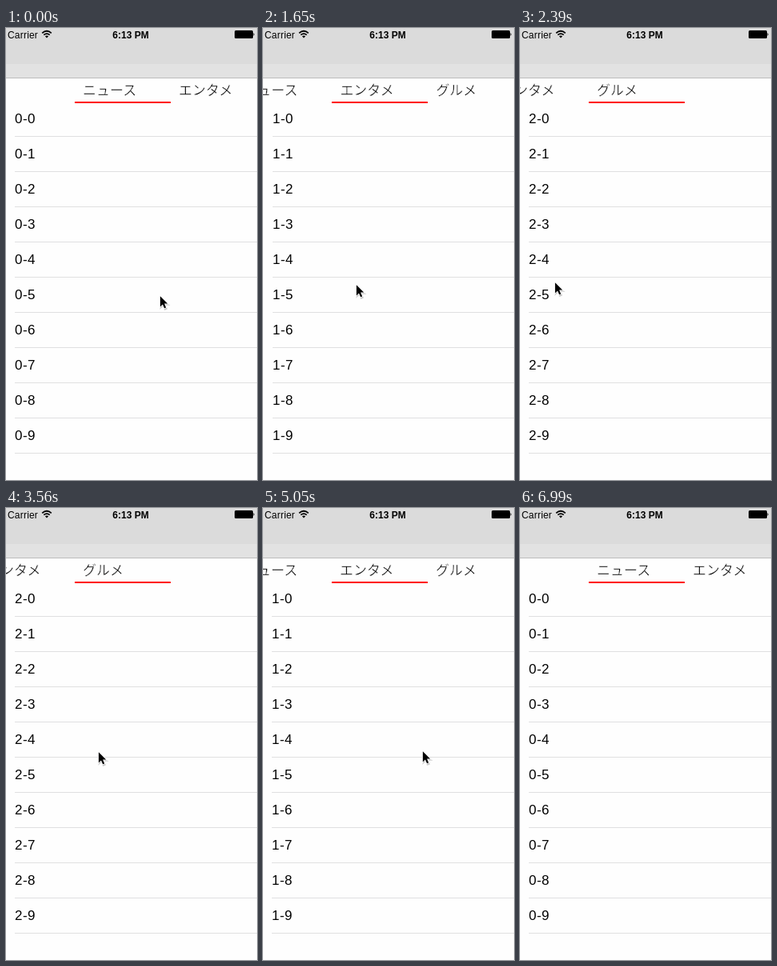
Write an HTML page that moves like this. It is 314x565 px and loops after 7710 ms.

```html
<!DOCTYPE html>
<html lang="ja">
<head>
<meta charset="utf-8">
<title>Tabbed pages</title>
<style>
  @property --scroll { syntax: "<number>"; inherits: true; initial-value: 0; }
  @property --x { syntax: "<number>"; inherits: true; initial-value: 192; }
  @property --y { syntax: "<number>"; inherits: true; initial-value: 335; }

  html, body { margin: 0; width: 100%; height: 100%; overflow: hidden; }
  #stage {
    position: relative; width: 314px; height: 565px; overflow: hidden;
    background: #fefefe; color: #000;
    font: 17px/44px "Liberation Sans", Arial, sans-serif;
    animation: session 7710ms step-end infinite;
  }
  #stage > * { position: absolute; }

  .bar {
    left: 0; top: 0; width: 314px; height: 62px;
    background: linear-gradient(#dbdbdb 45px, #e2e2e2 45px);
    border-bottom: 1px solid #bcbcbc;
  }
  .status { top: 1px; font-size: 12px; line-height: 17px; white-space: nowrap; }
  .carrier { left: 2px; letter-spacing: .2px; }
  .clock { left: 0; width: 312px; text-align: center; font-weight: bold; }
  .icons { left: 0; top: 0; }

  .tabs {
    left: 96px; top: 63px; display: flex;
    font: 17px/28px "Noto Sans CJK JP", "Noto Sans CJK", sans-serif;
    -webkit-text-stroke: .5px #fefefe; /* thins the strokes */
    transform: translateX(calc(var(--scroll) * -.375px));
  }
  .tabs span { width: 120px; white-space: nowrap; }
  .marker { left: 86px; top: 92px; width: 120px; height: 2px; background: #f00; }

  .pages {
    left: -4px; top: 92px; display: flex;
    transform: translateX(calc(var(--scroll) * -1px));
  }
  .page { width: 320px; flex: none; }
  .row { height: 43px; margin-left: 15px; border-bottom: 1px solid #e0e0e1; letter-spacing: .45px; }

  .cursor {
    left: -.5px; top: -1px; overflow: visible;
    transform: translate(calc(var(--x) * 1px), calc(var(--y) * 1px));
  }

  @keyframes session {
    0%     { --scroll: 0; --x: 192; --y: 335; }
    5.83%  { --x: 198; --y: 335; }
    7.78%  { --x: 204; --y: 335; }
    /* swipe to the second page */
    15.56% { --scroll: 30; --x: 182; --y: 332; }
    17.5%  { --scroll: 235; --x: 135; --y: 324; }
    19.45% { --scroll: 309; --x: 118; --y: 321; }
    21.4%  { --scroll: 319; --x: 116; --y: 321; }
    /* swipe to the third page */
    23.34% { --scroll: 345; --x: 98; --y: 321; }
    25.29% { --scroll: 555; --x: 54; --y: 319; }
    27.1%  { --scroll: 627; --x: 43; --y: 318; }
    29.05% { --scroll: 638; --x: 43; --y: 318; }
    30.99% { --scroll: 640; }
    /* wander back */
    34.76% { --x: 52; --y: 324; }
    36.7%  { --x: 92; --y: 327; }
    38.65% { --x: 140; --y: 314; }
    40.59% { --x: 158; --y: 302; }
    42.41% { --x: 145; --y: 296; }
    44.35% { --x: 122; --y: 302; }
    46.17% { --x: 115; --y: 305; }
    /* swipe back to the second page */
    59.79% { --scroll: 615; --x: 138; --y: 305; }
    61.73% { --scroll: 405; --x: 184; --y: 304; }
    63.68% { --scroll: 332; --x: 198; --y: 304; }
    65.49% { --scroll: 320; --x: 199; --y: 304; }
    /* swipe back to the first page */
    67.44% { --scroll: 320; --x: 172; --y: 303; }
    69.39% { --scroll: 300; --x: 187; --y: 298; }
    71.33% { --scroll: 130; --x: 214; --y: 291; }
    73.28% { --scroll: 26; --x: 218; --y: 290; }
    75.09% { --scroll: 4; }
    77.04% { --scroll: 0; }
    /* leave the screen */
    82.87% { --x: 222; --y: 305; }
    84.82% { --x: 234; --y: 375; }
    86.77% { --x: 247; --y: 455; }
    88.71% { --x: 256; --y: 514; }
    90.66%, 100% { --scroll: 0; --x: -99; --y: 514; }
  }
</style>
</head>
<body>
<div id="stage">
  <div class="tabs"><span>ニュース</span><span>エンタメ</span><span>グルメ</span></div>
  <div class="pages"></div>
  <div class="marker"></div>
  <div class="bar"></div>
  <div class="status carrier">Carrier</div>
  <div class="status clock">6:13 PM</div>
  <svg class="icons" width="314" height="20">
    <g fill="none" stroke="#000" stroke-width="1.7">
      <path d="M45.2 6.3Q51 1.2 56.8 6.3M47.3 8.7Q51 5.4 54.7 8.7"/>
    </g>
    <path d="M48.9 10.3Q51 8.6 53.1 10.3L51 12.5Z"/>
    <rect x="286" y="3" width="23" height="10" rx="1.5"/>
    <path d="M309.5 6Q311.6 8 309.5 10Z"/>
  </svg>
  <svg class="cursor" width="14" height="20">
    <path d="M.5 1V15L3.9 11.8L6 16.9L8.6 15.8L6.5 10.9H11Z" transform="translate(.6 1.2)" fill="#0003" stroke="#0002" stroke-width="1.6"/>
    <path d="M.9 1.2V14.4L4 11.4L6.1 16.3L8.2 15.4L6.1 10.6H10.2Z" stroke="#fff" stroke-width="1.8" paint-order="stroke"/>
  </svg>
</div>
<script>
  const row = (page, i) => `<div class="row">${page}-${i}</div>`;
  const page = p => `<div class="page">${Array.from({ length: 10 }, (_, i) => row(p, i)).join("")}</div>`;
  document.querySelector(".pages").innerHTML = [0, 1, 2].map(page).join("");
</script>
</body>
</html>
```
